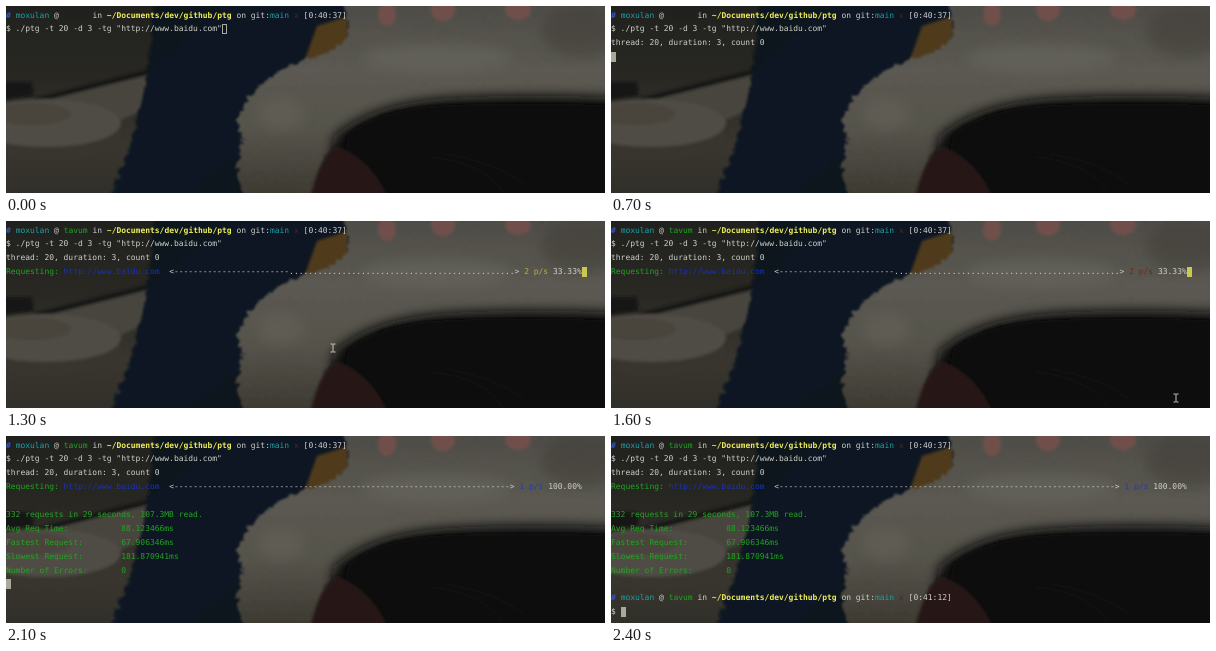
Animation of 599x187 px, one loop 2.5 s. Source, as an HTML page:

```html
<!DOCTYPE html>
<html lang="en">
<head>
<meta charset="utf-8">
<title>Terminal session</title>
<style>
html, body { margin: 0; width: 100%; height: 100%; overflow: hidden; background: #1b1a18; }
#stage { position: relative; width: 599px; height: 187px; overflow: hidden; }
svg { position: absolute; left: 0; top: 0; }
.row {
  position: absolute; white-space: pre; color: #d0d0cb;
  font: 7.97px/14px "DejaVu Sans Mono", "Liberation Mono", monospace;
  font-variant-ligatures: none;
}
.hash { color: #3458c4; font-weight: bold; }
.user, .branch { color: #1fa0a6; }
.host, .green { color: #22a522; }
.host.dim { color: #1c2226; }
.path { color: #eeee5c; font-weight: bold; }
.dirty { color: #4c2728; }
.url { color: #1a32b8; }
.cursor { position: absolute; box-sizing: border-box; width: 5px; height: 10px; background: #c8c94e; }
.cursor.hollow { background: none; border: 1px solid #a9a9a0; }
.cursor.pale { background: #a9a99a; }
</style>
</head>
<body>
<div id="stage">
<svg width="599" height="187" viewBox="0 0 599 187">
  <defs>
    <filter id="soft" x="-20%" y="-20%" width="140%" height="140%"><feGaussianBlur stdDeviation="1.6"/></filter>
    <filter id="haze" x="-40%" y="-40%" width="180%" height="180%"><feGaussianBlur stdDeviation="6"/></filter>
    <filter id="fuzz" x="-5%" y="-5%" width="110%" height="110%">
      <feTurbulence type="fractalNoise" baseFrequency=".16" numOctaves="2" seed="4" result="n"/>
      <feDisplacementMap in="SourceGraphic" in2="n" scale="9" xChannelSelector="R" yChannelSelector="G"/>
      <feGaussianBlur stdDeviation=".8"/>
    </filter>
    <linearGradient id="wall" x2="0" y2="1">
      <stop stop-color="#20211e"/><stop offset=".4" stop-color="#292823"/>
      <stop offset=".75" stop-color="#39362f"/><stop offset="1" stop-color="#312f29"/>
    </linearGradient>
    <linearGradient id="navy" x2="1" y2="1">
      <stop stop-color="#07121b"/><stop offset=".5" stop-color="#081724"/><stop offset="1" stop-color="#070e15"/>
    </linearGradient>
    <linearGradient id="plush" x2="0" y2="1">
      <stop stop-color="#4d4b45"/><stop offset=".35" stop-color="#5b5952"/>
      <stop offset=".65" stop-color="#56534b"/><stop offset="1" stop-color="#3a372f"/>
    </linearGradient>
  </defs>
  <rect width="599" height="187" fill="url(#wall)"/>
  <g filter="url(#soft)">
    <path d="M28 96L146 67L138 104L110 116Z" fill="#46443c"/>
    <path d="M28 92L146 62V68L30 97Z" fill="#171814"/>
    <ellipse cx="40" cy="130" rx="75" ry="24" fill="#37342d"/>
    <ellipse cx="40" cy="117" rx="75" ry="24" fill="#4f4c44"/>
    <ellipse cx="25" cy="108" rx="40" ry="11" fill="#48453e"/>
    <path d="M-4 76H26L28 90L-4 94Z" fill="#151613"/>
  </g>
  <path d="M148 -5H350L330 50L262 95L250 192H104L124 140L141 75Z" fill="url(#navy)" filter="url(#fuzz)"/>
  <path d="M311 20L342 10V48L298 56Z" fill="#4f3b1f" filter="url(#soft)"/>
  <path d="M336 -6L342 16L341 34L322 47L300 53L271 66L244 89L231 112L237 137L230 160L238 194H310L318 150L345 125L390 104H605V-6Z" fill="url(#plush)" filter="url(#fuzz)"/>
  <g filter="url(#haze)" opacity=".5">
    <ellipse cx="430" cy="52" rx="75" ry="14" fill="#6b6962"/>
    <ellipse cx="275" cy="108" rx="24" ry="16" fill="#66645b"/>
    <ellipse cx="575" cy="25" rx="40" ry="26" fill="#403e39"/>
  </g>
  <g fill="#70504c" filter="url(#soft)">
    <ellipse cx="381" cy="8" rx="9" ry="12"/>
    <ellipse cx="437" cy="4" rx="12" ry="11"/>
    <ellipse cx="512" cy="4" rx="13" ry="10"/>
  </g>
  <path d="M328 130Q365 97 440 92T625 92V210H318Z" fill="#080909" filter="url(#haze)"/>
  <path d="M342 128Q375 102 440 99T605 99V192H330Z" fill="#080909" filter="url(#soft)"/>
  <path d="M304 192Q314 148 332 141Q366 154 382 192Z" fill="#271915" filter="url(#soft)"/>
  <path d="M425 151Q480 157 497 187M440 148Q490 156 518 178" fill="none" stroke="#1f1914" stroke-width=".6"/>
</svg>
<div id="term"></div>
<svg id="mouse" width="9" height="11" viewBox="-4.5 -5.5 9 11">
  <path d="M-2.5 -4H-.7L0 -3.4L.7 -4H2.5M0 -3.4V3.4M-2.5 4H-.7L0 3.4L.7 4H2.5" fill="none" stroke="#c8c8c4"/>
</svg>
</div>
<script>
const LOOP = 2500, COL = 4.8, LINE = 13.9;
const term = document.getElementById('term');
const mouse = document.getElementById('mouse');
const timed = [];

function add(cls, x, y, from, to, html = '') {
  const el = document.createElement('div');
  el.className = cls;
  el.style.left = x + 'px';
  el.style.top = y + 'px';
  el.innerHTML = html;
  term.append(el);
  timed.push({ el, from, to });
}
const row = (line, html, from = 0, to = LOOP) =>
  add('row', 0, 2.5 + line * LINE, from, to, html);
const cursor = (line, col, from, to, kind = '') =>
  add('cursor ' + kind, Math.round(col * COL), Math.round(4.2 + line * LINE), from, to);
const span = (cls, text) => `<span class="${cls}">${text}</span>`;

const prompt = (clock, host = 'host') =>
  `${span('hash', '#')} ${span('user', 'moxulan')} @ ${span(host, 'tavum')} in ` +
  `${span('path', '~/Documents/dev/github/ptg')} on git:${span('branch', 'main')} ` +
  `${span('dirty', 'x')} [${clock}]`;

function progress(done, rate, color, from, to) {
  const pct = (done * 100).toFixed(2) + '%';
  const size = 77 - pct.length;
  const full = Math.round(size * done);
  const bar = '-'.repeat(full) + '.'.repeat(size - full);
  row(3, `${span('green', 'Requesting:')} ${span('url', 'http://www.baidu.com')}  ` +
    `&lt;${bar}&gt; <span style="color:${color}">${rate} p/s</span> ${pct}`, from, to);
}

row(0, prompt('0:40:37', 'host dim'), 0, 800);
row(0, prompt('0:40:37'), 800);
row(1, '$ ./ptg -t 20 -d 3 -tg "http://www.baidu.com"');
row(2, 'thread: 20, duration: 3, count 0', 500);

progress(0, '?', '#2c2b28', 800, 1200);
progress(1 / 3, 2, '#b9b032', 1200, 1500);
progress(1 / 3, 2, '#6e2a1c', 1500, 1700);
progress(2 / 3, 2, '#6e2a1c', 1700, 2000);
progress(1, 1, '#1f40a8', 2000, LOOP);

const stats = [
  ['Avg Req Time:', '88.123466ms'],
  ['Fastest Request:', '67.906346ms'],
  ['Slowest Request:', '181.870941ms'],
  ['Number of Errors:', '0']
];
row(5, span('green', '332 requests in 29 seconds, 107.3MB read.'), 2000);
stats.forEach(([name, value], i) => row(6 + i, span('green', name.padEnd(24) + value), 2000));
row(11, prompt('0:41:12'), 2200);
row(12, '$', 2200);

cursor(1, 45, 0, 300, 'hollow');
cursor(1, 45, 300, 500, 'pale');
cursor(3, 0, 500, 800, 'pale');
cursor(3, 120, 800, 2000);
cursor(10, 0, 2000, 2200, 'pale');
cursor(12, 2, 2200, LOOP, 'pale');

// Pointer rests, hides while typing, then speeds off to the lower right.
function pointer(t) {
  if (t >= 300 && t < 500) return [181, 86];
  if (t >= 900 && t < 1700) {
    const u = (t - 1000) / 300;
    return [208 + 59.5 * u * (1 + u), 100 + 15.5 * u + 11.5 * u * u];
  }
  if (t >= 1700 && t < 1800) return [568, 184];
  return null;
}

function draw() {
  const t = Math.floor(performance.now() % LOOP / 100) * 100;
  for (const { el, from, to } of timed)
    el.style.visibility = t >= from && t < to ? 'visible' : 'hidden';
  const p = pointer(t);
  mouse.style.visibility = p ? 'visible' : 'hidden';
  if (p) mouse.style.transform = `translate(${Math.round(p[0]) - 4.5}px, ${Math.round(p[1]) - 5.5}px)`;
  requestAnimationFrame(draw);
}
draw();
</script>
</body>
</html>
```
